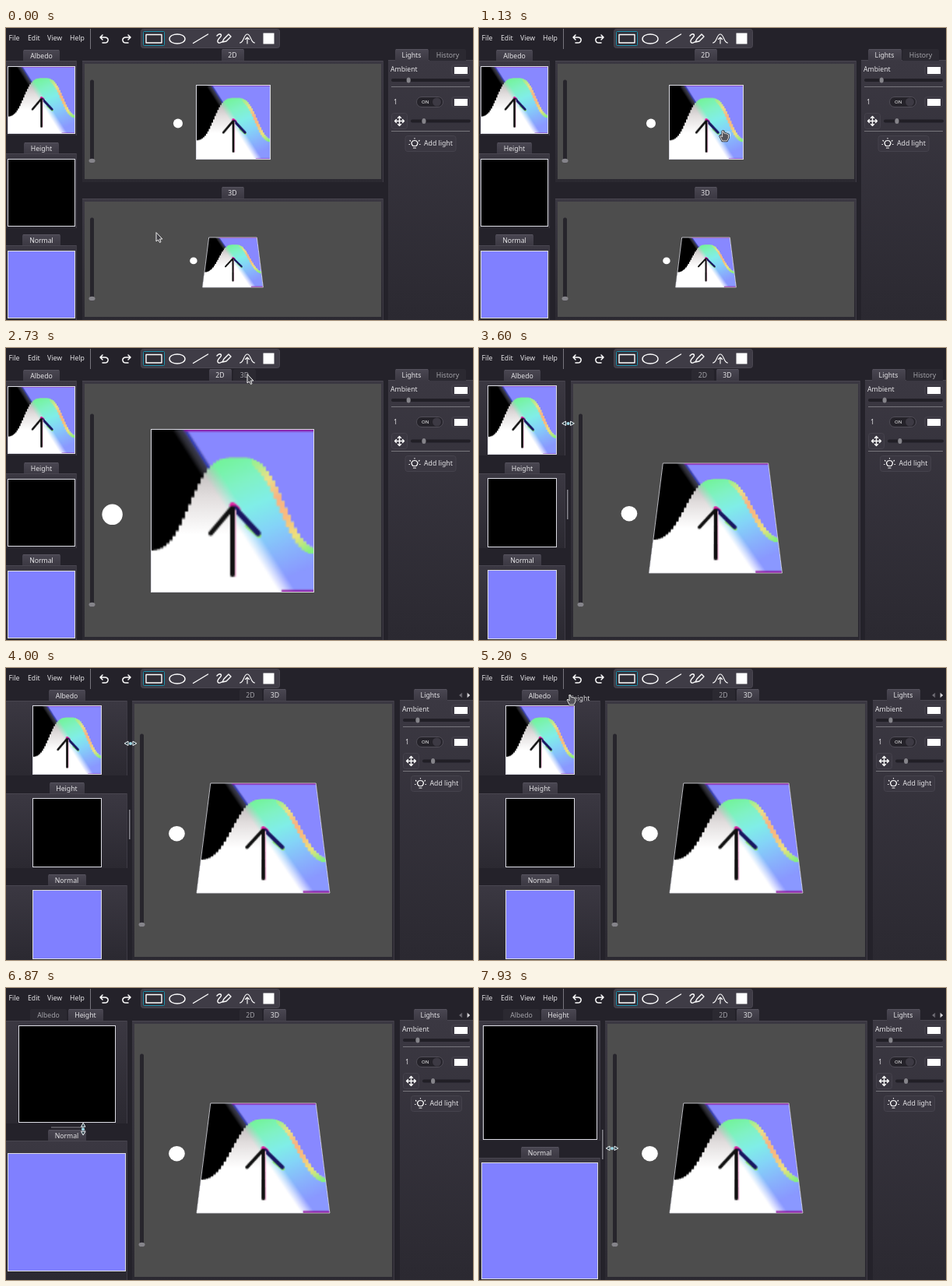
An HTML page with a canvas for the animation above (8 s loop, 600 by 375 pixels).

```html
<!DOCTYPE html>
<html lang="en">
<head>
<meta charset="utf-8">
<title>Dockable panels</title>
<style>
  html, body { margin: 0; width: 100%; height: 100%; overflow: hidden; background: #24222a; }
  canvas { display: block; width: 600px; height: 375px; }
</style>
</head>
<body>
<canvas id="stage" width="600" height="375"></canvas>
<script>
const LOOP = 8000, STEP = 1000 / 15;
const ctx = document.getElementById('stage').getContext('2d');
const FONT = '8.7px "Noto Sans", "Open Sans", sans-serif';

// Cursor stops: time, x, y
const PATH = [
  [0, 193, 263], [150, 193, 263], [600, 290, 212], [750, 290, 212], [1450, 345, 37], [1800, 351, 38],
  [1950, 351, 38], [2300, 277, 34], [2450, 277, 34], [2660, 310, 34], [2900, 310, 34], [3300, 95, 97],
  [3400, 95, 97], [3950, 160, 97], [4130, 160, 97], [4500, 78, 152], [4600, 78, 152], [5150, 117, 39],
  [5350, 117, 39], [5900, 99, 145], [6400, 99, 145], [7200, 99, 203], [7400, 99, 203], [7800, 171, 206], [8000, 171, 206]
];
const CURSORS = [
  [0, 'arrow'], [650, 'hand'], [1950, 'arrow'], [3280, 'horizontal'], [4180, 'arrow'], [4450, 'hand'],
  [5400, 'arrow'], [5860, 'vertical'], [7450, 'arrow'], [7700, 'horizontal']
];

const lerp = (a, b, k) => a + (b - a) * k;
const smooth = k => k * k * (3 - 2 * k);
const ramp = (t, from, to) => smooth(Math.min(1, Math.max(0, (t - from) / (to - from))));
const within = (t, a, b) => t >= a && t < b;

function cursorAt(t) {
  const i = Math.max(1, PATH.findIndex(p => p[0] > t));
  const [t0, x0, y0] = PATH[i - 1], [t1, x1, y1] = PATH[i];
  const k = ramp(t, t0, t1);
  return [lerp(x0, x1, k), lerp(y0, y1, k)];
}

function gradient(g, x0, y0, x1, y1, colors) {
  const fill = g.createLinearGradient(x0, y0, x1, y1);
  colors.forEach((c, i) => fill.addColorStop(i / (colors.length - 1), c));
  return fill;
}

function rect(x, y, w, h, fill) {
  ctx.fillStyle = fill;
  ctx.fillRect(x, y, w, h);
}

function round(x, y, w, h, r, fill, stroke) {
  ctx.beginPath();
  ctx.roundRect(x, y, w, h, r);
  if (fill) { ctx.fillStyle = fill; ctx.fill(); }
  if (stroke) { ctx.strokeStyle = stroke; ctx.lineWidth = 1; ctx.stroke(); }
}

function ellipse(x, y, rx, ry, fill) {
  ctx.beginPath();
  ctx.ellipse(x, y, rx, ry, 0, 0, 7);
  ctx.fillStyle = fill;
  ctx.fill();
}

function text(s, x, y, fill = '#e4e3e6', align = 'left') {
  ctx.font = FONT;
  ctx.textAlign = align;
  ctx.fillStyle = fill;
  ctx.fillText(s, x, y + 3);
}

function trace(d, color = '#fff', width = 1.4, x = 0, y = 0, fill) {
  ctx.save();
  ctx.translate(x, y);
  const path = new Path2D(d);
  ctx.lineCap = ctx.lineJoin = 'round';
  ctx.lineWidth = width;
  ctx.strokeStyle = color;
  if (fill) { ctx.fillStyle = fill; ctx.fill(path); }
  ctx.stroke(path);
  ctx.restore();
}

function layer() {
  const c = document.createElement('canvas');
  c.width = c.height = 105;
  const g = c.getContext('2d');
  g.scale(.5, .5);
  return [c, g];
}

// Bell outline in coarse steps, as in low-resolution pixel art
function bellSteps(from) {
  const path = new Path2D(), step = 4;
  for (let x = from; x < 212; x += step) {
    const y = 157 - 120 * Math.exp(-Math.pow(Math.abs(x + step / 2 - 111) / 68, 3.4));
    path.lineTo(x, y);
    path.lineTo(x + step, y);
  }
  return path;
}

// The painted texture, described on a 210 x 210 square
function makeTexture() {
  const [canvas, g] = layer(), [tint, h] = layer();
  const across = (c, from, to, colors) =>
    gradient(c, 38 + .843 * from, -.538 * from, 38 + .843 * to, -.538 * to, colors);
  const bell = bellSteps(0);
  bell.lineTo(212, 210);
  bell.lineTo(0, 210);
  const line = (d, color, width) => {
    g.strokeStyle = color;
    g.lineWidth = width;
    g.stroke(new Path2D(d));
  };
  g.lineCap = 'round';
  g.fillStyle = across(g, -10, 8, ['#000', '#1c1c20', '#303038', '#38384c', '#4c4c98', '#8888ff']);
  g.fillRect(0, 0, 210, 210);
  line('M46 4L76 52', '#2c3cc4', 2);
  g.fillStyle = '#8c0a98';
  g.fillRect(43, 0, 167, 3);

  g.save();
  g.clip(bell);
  g.fillStyle = gradient(g, 0, 40, 0, 135, ['#b4b0b0', '#e2dede', '#fff']);
  g.fillRect(0, 0, 210, 210);
  h.fillStyle = gradient(h, 100, 37, 168, 195, ['#74f49c', '#80f2c4', '#80eee8', '#84d4f8', '#88b4fc', '#8a98ff']);
  h.fillRect(0, 0, 210, 210);
  h.globalCompositeOperation = 'destination-in';
  h.fillStyle = across(h, -6, 13, ['#0000', '#0007', '#000']);
  h.fillRect(0, 0, 210, 210);
  g.drawImage(tint, 0, 0, 210, 210);
  g.strokeStyle = gradient(g, 136, 41, 208, 156, ['#9cf090', '#ece088', '#f8b484', '#f8bc80', '#eee27c', '#84f080']);
  g.lineWidth = 13;
  g.stroke(bellSteps(136));
  g.restore();

  g.fillStyle = '#8c0a98';
  g.fillRect(168, 207, 42, 3);
  line('M105 98L111 103', '#e020a0', 8);
  line('M124 124L139 137', '#8ce878', 6);
  line('M108 102L138 134', '#181660', 7);
  line('M108 105V188', '#f0b8d8', 4);
  line('M105 102V187M104 102L77 134', '#101010', 6);
  return canvas;
}
const texture = makeTexture();

function picture(cx, cy, size, kind) {
  const x = Math.round(cx - size / 2), y = Math.round(cy - size / 2), s = Math.round(size);
  if (kind === 'Albedo') ctx.drawImage(texture, x, y, s, s);
  else rect(x, y, s, s, kind === 'Height' ? '#000' : '#8080ff');
  ctx.strokeStyle = '#dcdce4';
  ctx.lineWidth = 1;
  ctx.strokeRect(x + .5, y + .5, s - 1, s - 1);
}

function flatScene(cx, cy, k) {
  picture(cx, cy + 1, 95.5 * k, 'Albedo');
  ellipse(cx - 70.3 * k, cy + 2.4 * k, 6 * k, 6 * k, '#fff');
}

// Perspective plane painted as one slice per pixel row
function tiltedScene(cx, cy, k) {
  const top = Math.round(cy - 27.6 * k), rows = Math.round(64.2 * k);
  const near = 77.6 * k, far = 61.4 * k;
  const depth = f => f * near / lerp(far, near, f) * 105;
  for (let i = 0; i < rows; i++) {
    const w = lerp(far, near, (i + .5) / rows);
    const v0 = depth(i / rows), v1 = depth((i + 1) / rows);
    ctx.drawImage(texture, 0, v0, 105, v1 - v0, cx - w / 2, top + i, w, 1);
  }
  ctx.beginPath();
  for (const [x, y] of [[-far, 0], [far, 0], [near, rows], [-near, rows]]) ctx.lineTo(cx + x / 2, top + y);
  ctx.closePath();
  ctx.strokeStyle = '#d8d8e0';
  ctx.lineWidth = .8;
  ctx.stroke();
  ellipse(cx - 50.4 * k, cy + 1.9 * k, 4.7 * k, 4.4 * k, '#fff');
}

function panel(x, y, w, h) {
  rect(x, y, w, h, gradient(ctx, 0, y, 0, y + h, ['#3b3842', '#2b2931']));
  rect(x, y, w, 1, '#494650');
  rect(x + w - 1, y, 1, h, '#3e3b45');
}

function tab(cx, y, label, on = true) {
  ctx.font = FONT;
  const w = Math.round(ctx.measureText(label).width) + 18, x = Math.round(cx - w / 2);
  round(x, y, w, 15, [2, 2, 0, 0], on ? gradient(ctx, 0, y, 0, y + 15, ['#4a4752', '#3b3842']) : '#2b2931');
  if (on) rect(x + 1, y, w - 2, 1, '#56535e');
  text(label, cx, y + 7.5, on ? '#e4e3e6' : '#a3a2a8', 'center');
}

function viewport(x, right, y, bottom, kind) {
  panel(x, y, right - x, bottom - y);
  const top = y + 4, h = bottom - y - 8, cx = (x + right) / 2, k = h / 147.5;
  rect(x + 3, top, right - x - 6, h, '#4d4d4d');
  ctx.save();
  ctx.beginPath();
  ctx.rect(x + 3, top, right - x - 6, h);
  ctx.clip();
  (kind === '2D' ? flatScene : tiltedScene)(cx, top + h / 2, k);
  ctx.restore();
  const inset = .102 * h + 5.4, knob = top + h - inset - 3;
  round(x + 10, top + inset, 5, h - 2 * inset, 2.5, '#27252c');
  ellipse(x + 12.5, knob, 4, 2.8, '#85848a');
}

function imageDock(w, y, bottom, kind) {
  panel(0, y + 14, w, bottom - y - 14);
  const size = Math.min(w - 4, bottom - y - 21);
  picture(w / 2, (y + 14 + bottom) / 2 + 2, size, kind);
}

function leftDocks(w, split, docked) {
  if (docked) {
    tab(w / 2 - 23.5, 27, 'Albedo', false);
    tab(w / 2 + 24, 27, 'Height');
    imageDock(w, 28, split, 'Height');
    tab(w / 2, split + 8, 'Normal');
    imageDock(w, split + 8, 375, 'Normal');
    return;
  }
  [['Albedo', 28, 138], ['Height', 147, 257], ['Normal', 265, 375]].forEach(([name, y, bottom]) => {
    tab(w / 2, y, name);
    imageDock(w, y, bottom, name);
  });
}

function middleDocks(x, right, merged, active) {
  const cx = (x + right) / 2;
  if (merged) {
    for (const [name, dx] of [['2D', -16.5], ['3D', 15]]) tab(cx + dx, 27, name, name === active);
    viewport(x, right, 42, 375, active);
  } else {
    tab(cx - .5, 27, '2D');
    viewport(x, right, 42, 198, '2D');
    tab(cx - .5, 204, '3D');
    viewport(x, right, 219, 375, '3D');
  }
}

function slider(x, right, y) {
  round(x, y - 2, right - x, 4, 2, '#211f26');
  ellipse(lerp(x, right, .22), y, 2.6, 3.6, '#85848a');
}

function button(x, y, w, h) {
  round(x, y, w, h, 3, '#3a3741', '#45424c');
}

function swatch(y) {
  button(572.5, y - 6.5, 23, 13);
  rect(576, y - 4, 17, 9, '#fff');
}

function lightsDock(x, narrow) {
  panel(x, 41, 601 - x, 334);
  if (narrow < .4) {
    tab(x + 30, 27, 'Lights');
    tab(x + 76.5, 27, 'History', false);
  } else {
    tab(545, 27, 'Lights');
    trace('M585.5 32.5L582.5 35L585.5 37.5Z', '#77757d', .5, 0, 0, '#77757d');
    trace('M593 32.5L596 35L593 37.5Z', '#d8d7da', .5, 0, 0, '#d8d7da');
  }
  const left = x + 4;
  text('Ambient', left - 1, 53);
  swatch(54);
  slider(left, 596, 67);
  rect(left, 75, 596 - left, 1, '#77757c');
  text('1', x + 7, 95);
  round(527.5, 88.5, 34, 13, 6.5, '#25232a', '#514e58');
  ctx.font = '6px "Noto Sans", sans-serif';
  ctx.fillStyle = '#fff';
  ctx.fillText('ON', 534, 97.2);
  ellipse(553.5, 95, 5.5, 5.5, '#3d3a44');
  swatch(95);
  button(left + .5, 109.5, 20, 20);
  trace('M-6 0H6M0-6V6M-4-2L-6 0L-4 2M4-2L6 0L4 2M-2-4L0-6L2-4M-2 4L0 6L2 4', '#fff', 1.3, left + 10.5, 119.5);
  slider(left + 25, 597, 119.5);
  rect(left, 132, 596 - left, 1, '#77757c');
  const cx = (x + 600) / 2;
  button(cx - 32.5, 138.5, 65, 20);
  trace('M-2 3C-6-1-3-4 0-4S6-1 2 3ZM-1.5 5.5H1.5M0-7V-6.5M-6-4L-5.5-3.5M6-4L5.5-3.5M-7 1H-6.5M7 1H6.5', '#fff', 1.2, cx - 20.5, 148.5);
  text('Add light', cx - 8.5, 147.5);
}

function toolbar() {
  [['File', 3.5], ['Edit', 28], ['View', 53], ['Help', 82]].forEach(([s, x]) => text(s, x, 13));
  rect(108, 1, 1, 26, '#77757c');
  const undo = 'M-2-5L-5-2L-2 1M-5-2H1C7-2 6 5 1 5H-2';
  trace(undo, '#fff', 1.5, 126, 14);
  ctx.save();
  ctx.translate(155, 14);
  ctx.scale(-1, 1);
  trace(undo, '#fff', 1.5);
  ctx.restore();
  round(173.5, 1.5, 178, 24, 3, '#3f3c46', '#4a4751');
  round(176.5, 4.5, 27, 18, 1, '#302e36', '#1c91ad');
  trace('M180 8.5H200V19H180Z', '#fff', 1.4);
  trace('M210 14C210 6 230 6 230 14S210 22 210 14Z');
  trace('M240.5 19.5L259.5 8');
  trace('M271 10C274 6 279 8 275 12C269 18 273 21 277 18M278 18L280 14L286 8L289 11L283 17Z');
  trace('M300.5 19C306 19 305 8 310 8S314 19 319.5 19M310 20V12M307.5 14.5L310 12L312.5 14.5', '#fff', 1.1);
  rect(330.5, 6.5, 14, 14, '#fff');
}

function drawCursor(kind, x, y) {
  if (kind === 'arrow') {
    trace('M0 0V11L2.5 9L4.5 12.5L6 11.7L4.5 8H7.5Z', '#f0f0f0', 1, x, y, '#424147');
  } else if (kind === 'hand') {
    const hand = 'M-1-4V3L-3 1L-4 2L-1 8H5L7 4V0L5-1L3-1.5L1-2V-4Q0-5-1-4Z';
    trace(hand, '#202024', 2.4, x, y);
    trace(hand, '#f4f4f4', .9, x, y, '#55545a');
  } else {
    ctx.save();
    ctx.translate(x, y);
    if (kind === 'vertical') ctx.rotate(Math.PI / 2);
    trace('M-3-2.5V2.5L-7.5 0ZM3-2.5V2.5L7.5 0Z', '#eef6f8', 1, 0, 0, '#283c44');
    ellipse(0, 0, 2, 2, '#9ed8e6');
    ctx.restore();
  }
}

function draw(t) {
  const wide = ramp(t, 3400, 3950), w = Math.round(lerp(91, 156, wide));
  const right = Math.round(lerp(491, 506, wide));
  const split = Math.round(lerp(138, 196, ramp(t, 6400, 7200)));
  const kind = CURSORS.filter(c => c[0] <= t).pop()[1];
  const [x, y] = cursorAt(t);

  rect(0, 0, 600, 375, '#24222a');
  leftDocks(w, split, t >= 5350);
  middleDocks(w + (wide < .5 ? 7 : 6), right - (wide < .5 ? 6 : 7), t >= 1600, within(t, 2380, 2830) ? '2D' : '3D');
  lightsDock(right, wide);
  toolbar();
  if (kind === 'horizontal') rect(w + 2, 182, 1.5, 38, '#85848c');
  if (kind === 'vertical') rect(58, split + 4.5, 41, 1, '#85848c');
  if (within(t, 750, 1600)) text('3D', x - 1, y);
  if (within(t, 4600, 5350)) text('Height', x - 2, y);
  drawCursor(kind, x, y);
}

function play(now) {
  draw(Math.floor((now % LOOP) / STEP) * STEP);
  requestAnimationFrame(play);
}
requestAnimationFrame(play);
</script>
</body>
</html>
```
